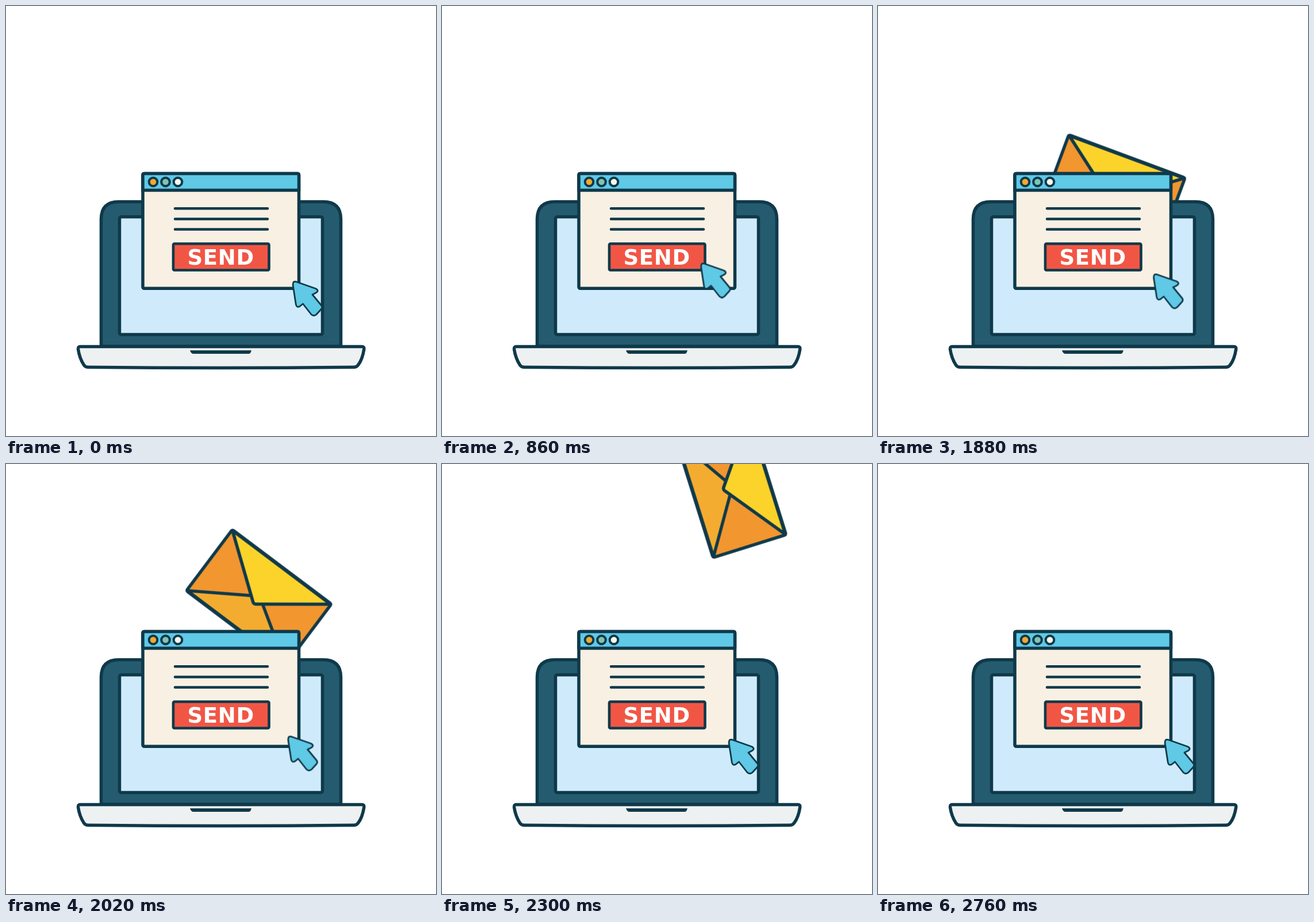
Animation of 748x748 px, one loop 3640 ms. Source, as an HTML page without scripts:

```html
<!DOCTYPE html>
<html lang="en">
<head>
<meta charset="utf-8">
<title>Send mail</title>
<style>
  html, body { margin: 0; width: 100%; height: 100%; overflow: hidden; background: #fff; }
  svg { display: block; width: 100vw; height: 100vh; }
  .ink { stroke: #0f394a; stroke-width: 5.5; stroke-linejoin: round; stroke-linecap: round; }
  .label { font: 700 37px "DejaVu Sans", sans-serif; letter-spacing: .7px; fill: #fff; }
  .ray { stroke: #fff; stroke-width: 1.7; }

  .cursor, .mail, .ray { animation: 3640ms linear infinite; }
  .cursor { animation-name: point; }
  .mail { animation-name: fly; }
  .ray { animation-name: burst; }

  @keyframes point {
    0%, .55% { transform: translate(0, 0); animation-timing-function: cubic-bezier(.34, 0, .45, 1); }
    23.63% { transform: translate(-48.5px, -31.5px); }
    40.66% { transform: translate(-48.5px, -31.5px); animation-timing-function: cubic-bezier(.34, 0, .45, 1); }
    63.74%, 100% { transform: translate(0, 0); }
  }
  @keyframes fly {
    0%, 41.76% { transform: translate(373px, 434px) rotate(0deg); animation-timing-function: cubic-bezier(.33, 0, .67, .33); }
    51.65% { transform: translate(410px, 323px) rotate(20.2deg); }
    58.24% { transform: translate(462px, 166px) rotate(48.7deg); }
    63.19% { transform: translate(504px, 40px) rotate(72.5deg); animation-timing-function: cubic-bezier(.33, 1, .67, 1); }
    75.81% { transform: translate(535px, -73px) rotate(90deg); }
    75.82%, 100% { transform: translate(373px, 434px) rotate(0deg); }
  }
  @keyframes burst {
    0%, 26.92% { stroke-dasharray: 0 60; stroke-dashoffset: 0; }
    29.67% { stroke-dasharray: 9 60; stroke-dashoffset: 0; }
    38.46% { stroke-dasharray: 11 60; stroke-dashoffset: -12px; }
    41.21%, 100% { stroke-dasharray: 0 60; stroke-dashoffset: -28px; }
  }
</style>
</head>
<body>
<svg viewBox="0 0 748 748">
  <defs>
    <g id="rays">
      <path class="ray" d="M0 0H28"/>
      <path class="ray" d="M0 0H28" transform="rotate(22)"/>
      <path class="ray" d="M0 0H28" transform="rotate(44)"/>
      <path class="ray" d="M0 0H28" transform="rotate(66)"/>
    </g>
  </defs>

  <!-- envelope -->
  <g class="mail ink">
    <rect x="-107.500" y="-65" width="215.500" height="133" rx="3" fill="#f2962f"/>
    <path d="M-106.500 67L-3 1Q0 -1 3 1L107 67Z" fill="#f4ac30"/>
    <path d="M-106.500 -64H107L3 14Q0 16 -3 14Z" fill="#fbd32b"/>
  </g>

  <!-- laptop -->
  <g class="ink">
    <path d="M165.500 592V371Q165.500 340.500 196 340.500H552Q582.500 340.500 582.500 371V592Z" fill="#245b6f"/>
    <rect x="197.500" y="366.800" width="353" height="204.700" rx="3" fill="#cfebfb"/>
    <path d="M129 592.500H619Q623.500 592.500 622.800 597Q620 615 612.500 624.500Q610 628.300 605 628.300Q374 630.800 143 628.300Q138 628.300 135.500 624.500Q128 613 125.500 597Q125 592.500 129 592.500Z" fill="#eef1f1"/>
  </g>
  <path d="M320 599H427L425.500 603Q425 605 422 605H326Q322 605 320 599Z" fill="#0f394a"/>

  <!-- window -->
  <g class="ink">
    <rect x="238" y="291.500" width="271.500" height="199.700" rx="2.500" fill="#f8f0e3"/>
    <path d="M238 320.500V294Q238 291.500 240.500 291.500H507Q509.500 291.500 509.500 294V320.500Z" fill="#5fc9e6"/>
    <g stroke-width="4">
      <circle cx="256" cy="306" r="7.300" fill="#f5a82c"/>
      <circle cx="277.500" cy="306" r="7.300" fill="#7fc4b2"/>
      <circle cx="299" cy="306" r="7.300" fill="#fbf7ea"/>
    </g>
    <path d="M294 352.300H455M294 370.500H455M294 388.600H455" stroke-width="4.500"/>
    <rect x="291" y="413.500" width="166.500" height="46" rx="2" fill="#f15645" stroke-width="4.600"/>
  </g>
  <text class="label" x="315.500" y="449.700">SEND</text>

  <!-- click sparks -->
  <g transform="translate(456 457)">
    <use href="#rays" transform="rotate(182)"/>
    <path class="ray" d="M0 0H28" transform="rotate(270)"/>
    <use href="#rays" transform="rotate(193) scale(.62)"/>
  </g>

  <g class="cursor ink">
    <path stroke-width="2.800" fill="#5fc9e6" d="M505 479.700L538.500 491.500Q545.500 495 539 499L533 502L548.700 521Q551 524.500 548.200 527.500L540 536.500Q535.500 540.500 531 536.500L516.500 518L511 522.500Q505.500 525.500 504.300 519L499.200 486Q498.500 477.700 505 479.700Z"/>
  </g>
</svg>
</body>
</html>
```
